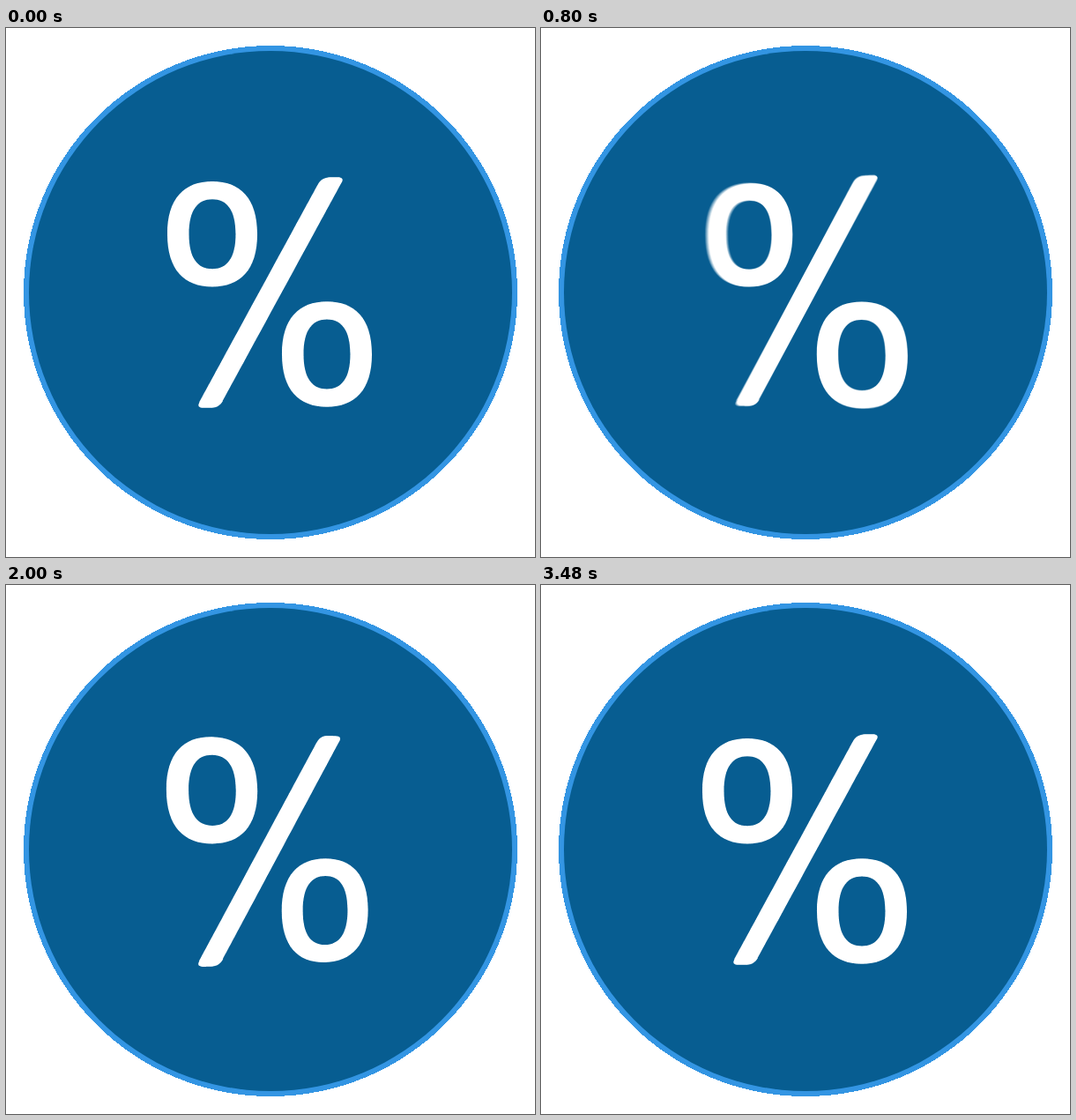
Write an HTML page with a canvas that moves like this. It is 600x600 px and loops after 5.08 s.

```html
<!DOCTYPE html>
<html lang="en">
<head>
<meta charset="utf-8">
<title>Spinning percent sign</title>
<style>
  html, body { margin: 0; width: 100%; height: 100%; overflow: hidden; background: #fff; }
  svg, canvas { position: absolute; left: 0; top: 0; width: 600px; height: 600px; }
</style>
</head>
<body>
<svg viewBox="0 0 600 600">
  <circle cx="300" cy="300" r="280" fill="#3395e3" shape-rendering="crispEdges"/>
  <circle cx="300" cy="300" r="274" fill="#075d91"/>
</svg>
<canvas id="sign" width="600" height="600"></canvas>
<script>
const ctx = document.getElementById('sign').getContext('2d');
const LOOP = 5080, STEP = 40, REST = 3480;
const CAMERA = 600 * 50 / 36;       // distance of a 50 mm lens
const SHUTTER = 20, SAMPLES = 17;   // motion blur

// time in ms, turn around the vertical axis in degrees
const KEYS = [[0, 0], [1000, 390], [1500, 345], [2000, 370], [3000, 350], [3500, 360]];

function angleAt(t) {
  if (t <= 0) return 0;
  for (let i = 1; i < KEYS.length; i++) {
    const [t0, a0] = KEYS[i - 1], [t1, a1] = KEYS[i];
    if (t < t1) {
      const u = (t - t0) / (t1 - t0);
      return a0 + (a1 - a0) * u * u * (3 - 2 * u);
    }
  }
  return 360;
}

// Outlines are a start point followed by cubic triples, relative to the centre.
function oval(cx, cy, rx, ry, kx, ky) {
  const quarter = [[kx, -1], [1, -ky], [1, 0], [1, ky], [kx, 1], [0, 1]];
  const unit = [[0, -1], ...quarter, ...quarter.map(([x, y]) => [-x, -y])];
  return unit.map(([x, y]) => [cx + x * rx, cy + y * ry]);
}

function ring(cx, cy) {
  return [oval(cx, cy, 51, 59.7, 0.62, 0.68), oval(cx, cy, 26.5, 39.5, 0.62, 0.7)];
}

function slash() {
  const half = [
    [-80.5, 124.5], [54, -123], [54, -123],
    [57.5, -129], [62, -130.8], [69, -130.8],
    [69, -130.8], [76, -130.8], [76, -130.8],
    [81.5, -130.8], [83, -128.5], [80.5, -124.5]
  ];
  return [half[11].map(v => -v), ...half, ...half.map(([x, y]) => [-x, -y])];
}

const GLYPH = [...ring(-66, -66.2), ...ring(64, 70)];
const BAR = [slash()];

function fill(outlines, angle) {
  const cos = Math.cos(angle), sin = Math.sin(angle);
  const project = ([x, y]) => {
    const s = CAMERA / (CAMERA + x * sin);
    return [300 + x * cos * s, 300 + y * s];
  };
  for (const outline of outlines) {
    const p = outline.map(project);
    ctx.moveTo(...p[0]);
    for (let i = 1; i < p.length; i += 3) ctx.bezierCurveTo(...p[i], ...p[i + 1], ...p[i + 2]);
    ctx.closePath();
  }
}

function draw(t) {
  ctx.clearRect(0, 0, 600, 600);
  ctx.globalCompositeOperation = 'lighter';
  ctx.globalAlpha = 1 / SAMPLES;
  ctx.fillStyle = '#fff';
  for (let i = 0; i < SAMPLES; i++) {
    const offset = t < REST ? (i / (SAMPLES - 1) - 0.5) * SHUTTER : 0;
    const angle = angleAt(t + offset) * Math.PI / 180;
    ctx.beginPath();
    fill(GLYPH, angle);
    fill(BAR, angle);
    ctx.fill('evenodd');
  }
}

let shown = -1;
function tick() {
  const t = performance.now() % LOOP;
  const step = t >= REST ? KEYS[KEYS.length - 1][0] : Math.floor(t / STEP) * STEP;
  if (step !== shown) draw(shown = step);
  requestAnimationFrame(tick);
}
tick();
</script>
</body>
</html>
```
